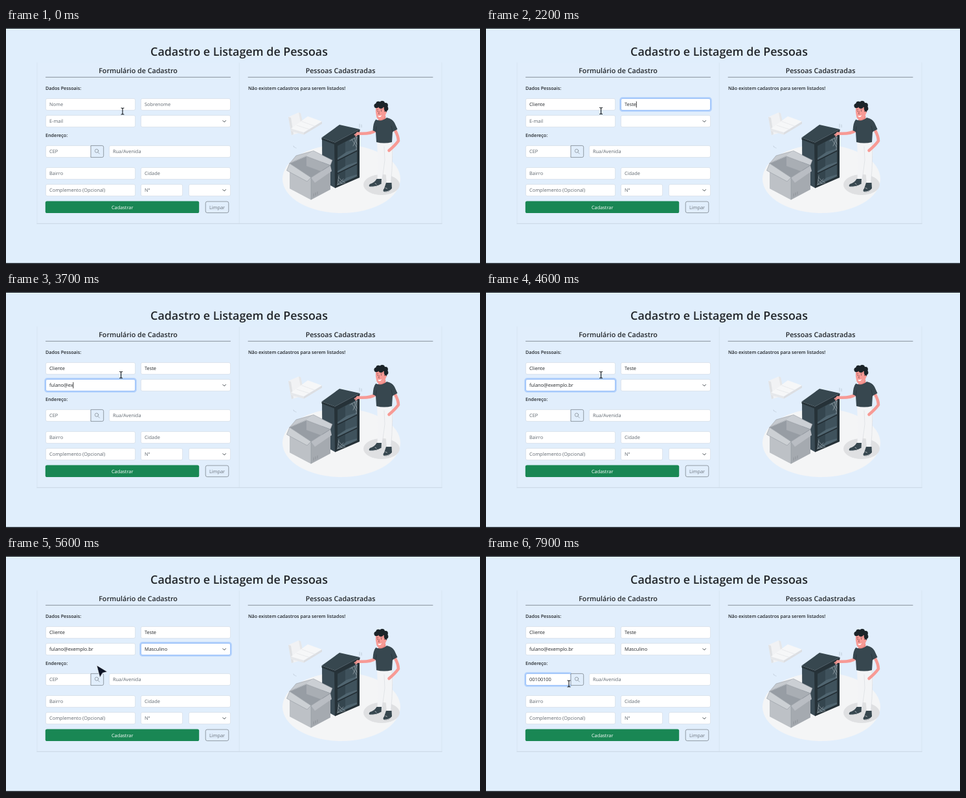
Recreate the animation shown at these times as an HTML page. Size 732 px wide and 366 px high, loop 8 s.

```html
<!DOCTYPE html>
<html lang="pt-BR">
<head>
<meta charset="utf-8">
<title>Cadastro e Listagem de Pessoas</title>
<style>
  html, body { margin: 0; width: 100%; height: 100%; overflow: hidden; background: #e0eefc; }
  svg { display: block; width: 732px; height: 366px; }
  text { font: 7.4px "Open Sans", "Noto Sans", sans-serif; fill: #212529; text-rendering: geometricPrecision; }
  .title { font-size: 17.85px; font-weight: 600; text-anchor: middle; }
  .head { font-size: 10.7px; font-weight: 600; text-anchor: middle; }
  .label { font-size: 7.18px; font-weight: 600; }
  .mid { text-anchor: middle; }
  .ln { fill: none; stroke-linecap: round; stroke-linejoin: round; }
</style>
</head>
<body>
<svg viewBox="0 0 732 366" xmlns="http://www.w3.org/2000/svg">
  <rect width="732" height="366" fill="#e0eefc"/>
  <rect width="732" height="1" fill="#0b0f14"/>
  <rect y="364.6" width="732" height="1.4" fill="#0b0f14"/>

  <!-- card -->
  <rect x="48" y="54" width="625" height="249" fill="#e1eefc"/>
  <path class="ln" d="M48 54V303M360.3 54V303M673 54V303" stroke="#d5e2f0" stroke-width=".8"/>
  <path class="ln" d="M48 303.4H673" stroke="#cddae8" stroke-width="1.2"/>
  <path class="ln" d="M61.5 76.3H346.5M374 76.3H659" stroke="#7d868f" stroke-width=".9"/>
  <text class="title" x="360" y="42.6">Cadastro e Listagem de Pessoas</text>
  <text class="head" x="204" y="69.6">Formulário de Cadastro</text>
  <text class="head" x="516.5" y="69.6">Pessoas Cadastradas</text>
  <text class="label" x="61" y="96">Dados Pessoais:</text>
  <text class="label" x="61" y="169">Endereço:</text>
  <text class="label" x="374" y="96">Não existem cadastros para serem listados!</text>

  <!-- floor -->
  <ellipse cx="518" cy="234" rx="91" ry="53" fill="#f4f5f6"/>
  <ellipse cx="580" cy="243" rx="28" ry="16" fill="#dfe0e2"/>

  <!-- white slabs -->
  <path d="M436 138L452 131L457 150L459 161L441 166Z" fill="#f1f2f4"/>
  <path d="M436 138L440 139L444 165L441 166Z" fill="#e0e2e5"/>
  <path d="M452 131L455 132L460 153L456 152Z" fill="#e6e7e9"/>
  <path d="M440 156L466 137L488 145L460 162Z" fill="#f6f7f8"/>
  <path d="M440 156L460 162V165.5L440 160Z" fill="#e6e8eb"/>
  <path d="M460 162L488 145V148.5L460 165.5Z" fill="#dcdee2"/>
  <path class="ln" d="M449 151L471 158M457 145L479 153" stroke="#e2e4e7" stroke-width=".7"/>

  <!-- cabinet -->
  <path d="M488 171L508 179V248L488.5 237Z" fill="#3b4c56"/>
  <path d="M507 179L546 159V232L508 248.5Z" fill="#263238"/>
  <path d="M512 183L542 167V230L512 243.5Z" fill="#3f525c"/>
  <path d="M512 183L524 177V238L512 243.5Z" fill="#34454e"/>
  <path d="M512 202L526 192L542 187V190L512 205.5Z" fill="#506570"/>
  <path d="M512 222L526 213L542 207.5V210.5L512 225.5Z" fill="#506570"/>
  <path d="M512 243.5L526 232L542 227V230Z" fill="#506570"/>
  <path class="ln" d="M512 205.5L542 190.5M512 225.5L542 211" stroke="#222d33" stroke-width="1.4"/>
  <path d="M487.5 170L515 150L546.5 157L508 177.5Z" fill="#37474f"/>
  <path d="M487.5 170L508 177.5L546.5 157V160L508 181L487.5 173Z" fill="#263238"/>
  <path class="ln" d="M542 169L531 175M542 169L536 183M542 169L541 189M534 173Q537 177 541 184M538 171Q539 176 542 180M512 243L514 229M512 243L521 234M512 243L524 240M514 232Q517 237 523 239M513 236Q515 239 519 241" stroke="#bac5cb" stroke-width=".5"/>

  <!-- cardboard box -->
  <path d="M438 210L464 199L501 213L471 232Z" fill="#979da4"/>
  <path d="M464 199L501 213L486 222L464 214Z" fill="#a9aeb4"/>
  <path d="M438 210L471 232V266.5L438 249Z" fill="#bdc1c6"/>
  <path d="M471 232L501 214V250.5L471 266.5Z" fill="#a5aab0"/>
  <path d="M438 210L448 198L475 190.5L464 199Z" fill="#c6cacf"/>
  <path d="M464 199L475 190.5L504 205L501 213Z" fill="#cbcfd4"/>
  <path d="M438 210L471 232L465 238L433.5 221Z" fill="#ccd0d4"/>
  <path d="M471 232L501 213L503 222L477 240Z" fill="#b9bdc3"/>
  <path class="ln" d="M438 210L471 232L501 213L464 199ZM471 232V266M438 210L433.5 221L465 238L471 232M438 210L448 198L475 190.5L504 205L501 213" stroke="#8b9198" stroke-width=".5"/>
  <path class="ln" d="M475 261V257M478 259.5V255.5M481 258V254" stroke="#7e848b" stroke-width=".6"/>
  <path class="ln" d="M444 183l1.4 2.2M447 185.5l1 .7M546 149v5M549 150v4" stroke="#a9b6c2" stroke-width=".6"/>

  <!-- man -->
  <path d="M573 175L596 174Q599 190 596 208L594.5 243H588L585 205L580.5 237H573.5L574 205Z" fill="#f3f4f6"/>
  <path class="ln" d="M584 184L585 205L581 236M596 178Q598 200 594.5 240" stroke="#d5d8dd" stroke-width=".6"/>
  <path d="M572.5 234H580L579.5 242Q573 246.5 562.5 246.5Q559 245 562 242Q569 240 572.5 234Z" fill="#37474f"/>
  <path d="M587 240H595.5L596 249Q593 254.5 584 254.5Q581 252 584 249Z" fill="#37474f"/>
  <path class="ln" d="M562 246.3Q572 246.6 579 242.5M583.5 254.3Q592 254 596 249.5" stroke="#f1f2f3" stroke-width=".8"/>
  <path class="ln" d="M570 241l2 1.4M586 248l2.4 1" stroke="#e4e7e9" stroke-width=".7"/>
  <path class="ln" d="M571 159Q562 165 543 163.5" stroke="#f79a95" stroke-width="4.6"/>
  <path class="ln" d="M543 163L538.5 165.5M544 164L540 167.5" stroke="#f79a95" stroke-width="1.8"/>
  <path class="ln" d="M600.5 158Q606 168 606 175Q601 182 591.5 190" stroke="#f79a95" stroke-width="4.6"/>
  <path d="M575 136H586L587 145L580 148L575 145Z" fill="#ee8a86"/>
  <path d="M571 142Q580 146 588 139Q597 141 600 147L604.5 157L597 161L596 177Q584 180 572 177L571 161L566.5 159Q567 147 571 142Z" fill="#37474f"/>
  <path class="ln" d="M597 161L595 152M571 161L572 153" stroke="#263238" stroke-width=".7"/>
  <path d="M571 121Q570.3 130 572 137Q573 142 577 142Q584 142 586.5 134L588 121Z" fill="#f79a95"/>
  <g fill="#1b2429">
    <circle cx="572" cy="120.6" r="3.6"/><circle cx="575" cy="117.6" r="3.8"/>
    <circle cx="581" cy="117" r="4"/><circle cx="586" cy="119.8" r="3.9"/>
    <circle cx="587" cy="125" r="3.4"/><circle cx="579" cy="121" r="4"/>
    <circle cx="586.4" cy="129" r="2"/>
    <circle cx="574" cy="129" r=".6"/><circle cx="579.6" cy="128.6" r=".6"/>
  </g>
  <circle cx="586" cy="131" r="1.8" fill="#f79a95"/>
  <path class="ln" d="M572.5 127l2-.6M578.4 126.2l2.4.3M576.3 129.5l-.9 3.6h1.4" stroke="#5b2f35" stroke-width=".5"/>
  <path d="M574 136Q577.5 137 580 135Q579 138.2 576.6 138.2Q575 138 574 136Z" fill="#fff"/>

  <!-- buttons -->
  <rect x="60.8" y="268.6" width="237.4" height="18.4" rx="2.6" fill="#198754"/>
  <text class="mid" x="179.7" y="280.6" style="fill:#fff">Cadastrar</text>
  <rect x="308.2" y="269.1" width="35.6" height="17.5" rx="2.6" fill="none" stroke="#7d868e" stroke-width=".8"/>
  <text class="mid" x="326" y="280.6" style="fill:#6c757d">Limpar</text>
  <g id="form"></g>
  <path d="M131 182.4H148.3Q150.7 182.4 150.7 184.8V198.2Q150.7 200.6 148.3 200.6H131Z" fill="#e1eefc" stroke="#7d868e" stroke-width=".8"/>
  <g class="ln" stroke="#737c84" stroke-width=".65"><circle cx="140" cy="190.6" r="2.7"/><path d="M142 192.7L144.4 195.1"/></g>
  <path id="caret" stroke="#111" stroke-width=".8"/>
  <g id="beam" class="ln"><path d="M-2 -5Q0 -5 0 -4Q0 -5 2 -5M0 -4V4M-2 5Q0 5 0 4Q0 5 2 5" stroke="#10151a" stroke-width="1.1"/></g>
  <path id="arrow" d="M0 0L16.5 10L9 12L5 19Z" fill="#0e1526" stroke="#f2f6fb" stroke-width=".7" stroke-linejoin="round"/>
</svg>
<script>
const LOOP = 8000, STEP = 100, FADE = 150;
const NS = 'http://www.w3.org/2000/svg';
const $ = id => document.getElementById(id);

function add(tag, attrs) {
  const el = document.createElementNS(NS, tag);
  for (const k in attrs) el.setAttribute(k, attrs[k]);
  return $('form').appendChild(el);
}

function field(x, y, w, hint, isSelect) {
  const box = { x: x + .4, y: y + .4, width: w - .8, height: 18.2, rx: 2.5 };
  const ring = add('rect', { x: x - .8, y: y - .8, width: w + 1.6, height: 20.6, rx: 3.4,
    fill: 'none', stroke: '#0d6efd', 'stroke-opacity': .24, 'stroke-width': 1.8 });
  add('rect', { ...box, fill: '#fff', stroke: '#d6dfe9', 'stroke-width': .8 });
  const edge = add('rect', { ...box, fill: 'none', stroke: '#86b7fe', 'stroke-width': .8 });
  if (isSelect) add('path', { class: 'ln', stroke: '#343a40', 'stroke-width': .9,
    d: `M${x + w - 12.2} ${y + 8.6}l2.3 2.3l2.3 -2.3` });
  const text = add('text', { x: x + 6, y: y + 12.2 });
  return { x, y, hint, ring, edge, text };
}

const name = field(61, 109, 139, 'Nome');
const last = field(208, 109, 139, 'Sobrenome');
const mail = field(61, 135, 139, 'E-mail');
const kind = field(208, 135, 139, '', true);
const zip = field(61, 182, 70.5, 'CEP');
const fields = [name, last, mail, kind, zip,
  field(159, 182, 188, 'Rua/Avenida'), field(61, 216, 139, 'Bairro'),
  field(208, 216, 139, 'Cidade'), field(61, 242, 139, 'Complemento (Opcional)'),
  field(208, 242, 65, 'Nº'), field(282, 242, 65, '', true)];

// times at which each successive character appears
const typed = [
  [name, 'Cliente', [700, 800, 900, 1000, 1100, 1200, 1200]],
  [last, 'Teste', [1600, 1700, 1900, 2000, 2100]],
  [mail, 'fulano@exemplo.br', [2500, 2700, 2800, 2900, 3000, 3100, 3300, 3400, 3700,
    3800, 3900, 4000, 4100, 4200, 4200, 4300, 4300]],
  [kind, 'Masculino', Array(9).fill(5100)],
  [zip, '00100100', [6300, 6400, 6600, 6900, 7000, 7200, 7300, 7500]]
];
const focus = [[60, name], [1300, last], [2210, mail], [4950, kind], [5960, zip]];
const mouse = [[0, 180, 129], [200, 177.6, 128.5], [4600, 177.6, 128.5], [4800, 259, 146],
  [5400, 259, 146], [5600, 140, 169.5], [5700, 112, 180], [5900, 84, 191],
  [7600, 84, 191], [7900, 128, 198]];

const clamp = v => Math.max(0, Math.min(1, v));

function mouseAt(t) {
  let i = 0;
  while (i < mouse.length - 2 && mouse[i + 1][0] <= t) i++;
  const [a, ax, ay] = mouse[i], [b, bx, by] = mouse[i + 1];
  const k = clamp((t - a) / (b - a));
  return [ax + (bx - ax) * k, ay + (by - ay) * k];
}

function glowOf(f, t) {
  const i = focus.findIndex(e => e[1] === f);
  if (i < 0) return 0;
  const ease = at => { const k = clamp((t - at) / FADE); return k * (2 - k); };
  return ease(focus[i][0]) - (focus[i + 1] ? ease(focus[i + 1][0]) : 0);
}

function draw(t) {
  const active = focus.filter(e => e[0] <= t).pop();
  let lastKey = active ? active[0] : -LOOP;
  for (const f of fields) {
    const entry = typed.find(e => e[0] === f);
    const keys = entry ? entry[2].filter(k => k <= t) : [];
    const value = entry ? entry[1].slice(0, keys.length) : '';
    f.value = value;
    f.text.textContent = value || f.hint;
    f.text.style.fill = value ? '#212529' : '#5f676f';
    const g = glowOf(f, t);
    f.ring.setAttribute('opacity', g);
    f.edge.setAttribute('opacity', g);
    if (active && active[1] === f && keys.length) lastKey = Math.max(lastKey, keys[keys.length - 1]);
  }

  const f = active && active[1];
  const showCaret = f && f !== kind && t - lastKey < 300;
  $('caret').setAttribute('visibility', showCaret ? 'visible' : 'hidden');
  if (showCaret) {
    const x = f.x + 6.3 + (f.value ? f.text.getComputedTextLength() : 0);
    $('caret').setAttribute('d', `M${x} ${f.y + 4.8}v9.6`);
  }

  const [mx, my] = mouseAt(t);
  const isArrow = t > 4600 && t < 5900;
  for (const [id, on] of [['arrow', isArrow], ['beam', !isArrow]]) {
    $(id).setAttribute('transform', `translate(${mx} ${my})`);
    $(id).setAttribute('visibility', on ? 'visible' : 'hidden');
  }
}

const start = performance.now();
function tick() {
  const t = (performance.now() - start) % LOOP;
  draw(Math.floor(t / STEP) * STEP);
  requestAnimationFrame(tick);
}
tick();
</script>
</body>
</html>
```
